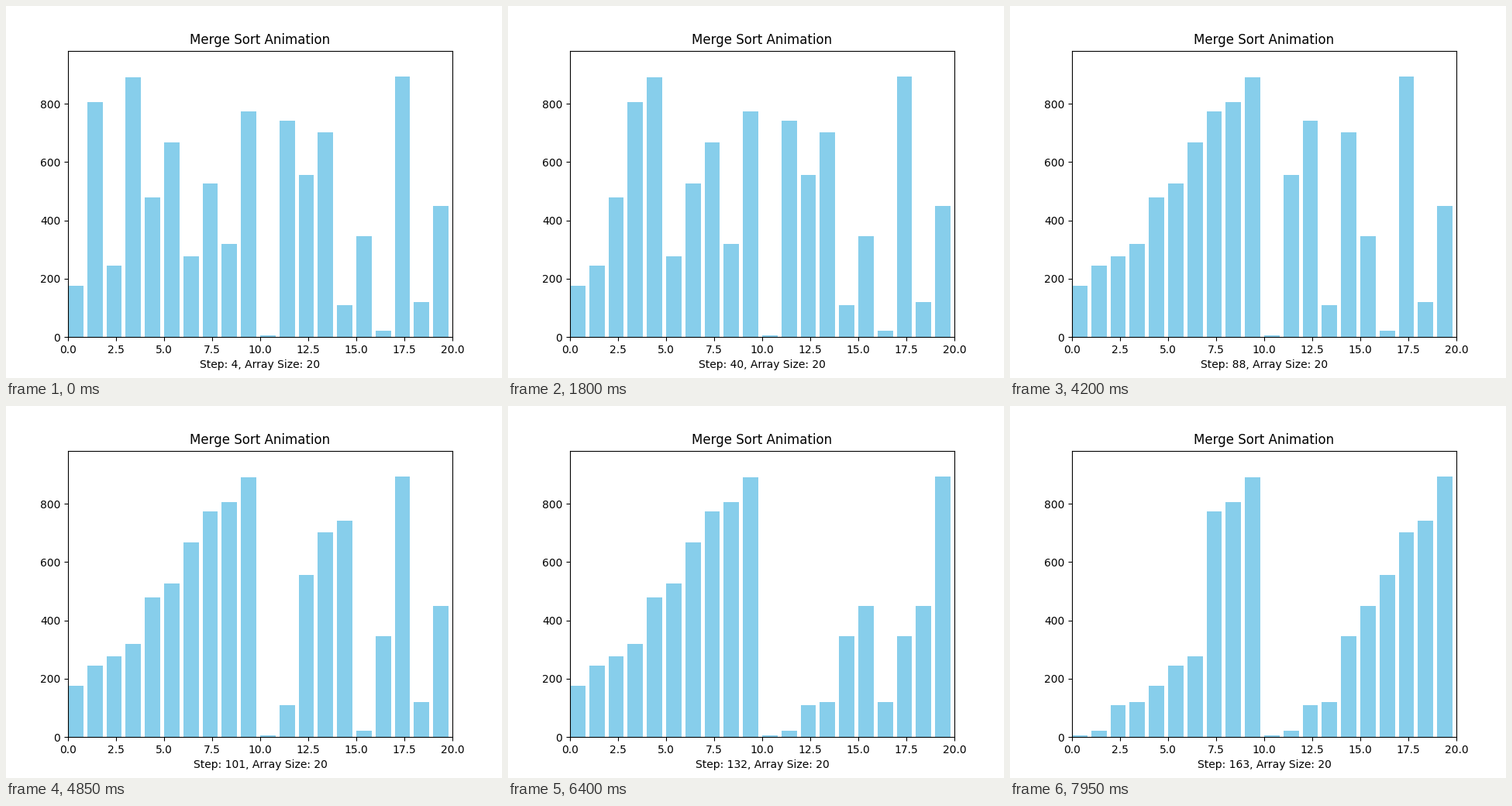
A matplotlib script that plays this animation: 640x480 px, repeating every 8 s.

```python
import matplotlib.pyplot as plt
from matplotlib.animation import FuncAnimation

VALUES = [175, 805, 245, 890, 478, 667, 277, 527, 320, 775,
          5, 743, 555, 702, 110, 346, 22, 893, 120, 450]
SIZE = len(VALUES)
FIRST_STEP = 4
FRAMES = 160
INTERVAL = 50


def merge(arr, lo, mid, hi):
    """Merge two sorted runs, pausing on every copy and every write."""
    left, right = [], []
    for k in range(lo, hi + 1):
        (left if k <= mid else right).append(arr[k])
        yield
    for k in range(lo, hi + 1):
        take_left = not right or (left and left[0] <= right[0])
        arr[k] = (left if take_left else right).pop(0)
        yield


def merge_sort(arr, lo, hi):
    if lo < hi:
        mid = (lo + hi) // 2
        yield from merge_sort(arr, lo, mid)
        yield from merge_sort(arr, mid + 1, hi)
        yield from merge(arr, lo, mid, hi)


def record_states(values):
    arr = list(values)
    states = [list(arr)]
    for _ in merge_sort(arr, 0, len(arr) - 1):
        states.append(list(arr))
    return states


states = record_states(VALUES)

fig, ax = plt.subplots(figsize=(6.4, 4.8), dpi=100)
ax.set_title("Merge Sort Animation")
bars = ax.bar(range(SIZE), VALUES, width=0.8, align="edge", color="skyblue")
ax.set_xlim(0, SIZE)
ax.set_ylim(0, 1.1 * max(VALUES))
label = ax.set_xlabel("")


def draw(frame):
    step = FIRST_STEP + frame
    for bar, value in zip(bars, states[step]):
        bar.set_height(value)
    label.set_text(f"Step: {step}, Array Size: {SIZE}")
    return [*bars, label]


anim = FuncAnimation(fig, draw, frames=FRAMES, interval=INTERVAL,
                     init_func=lambda: draw(0), repeat=True, repeat_delay=0)
plt.show()
```
